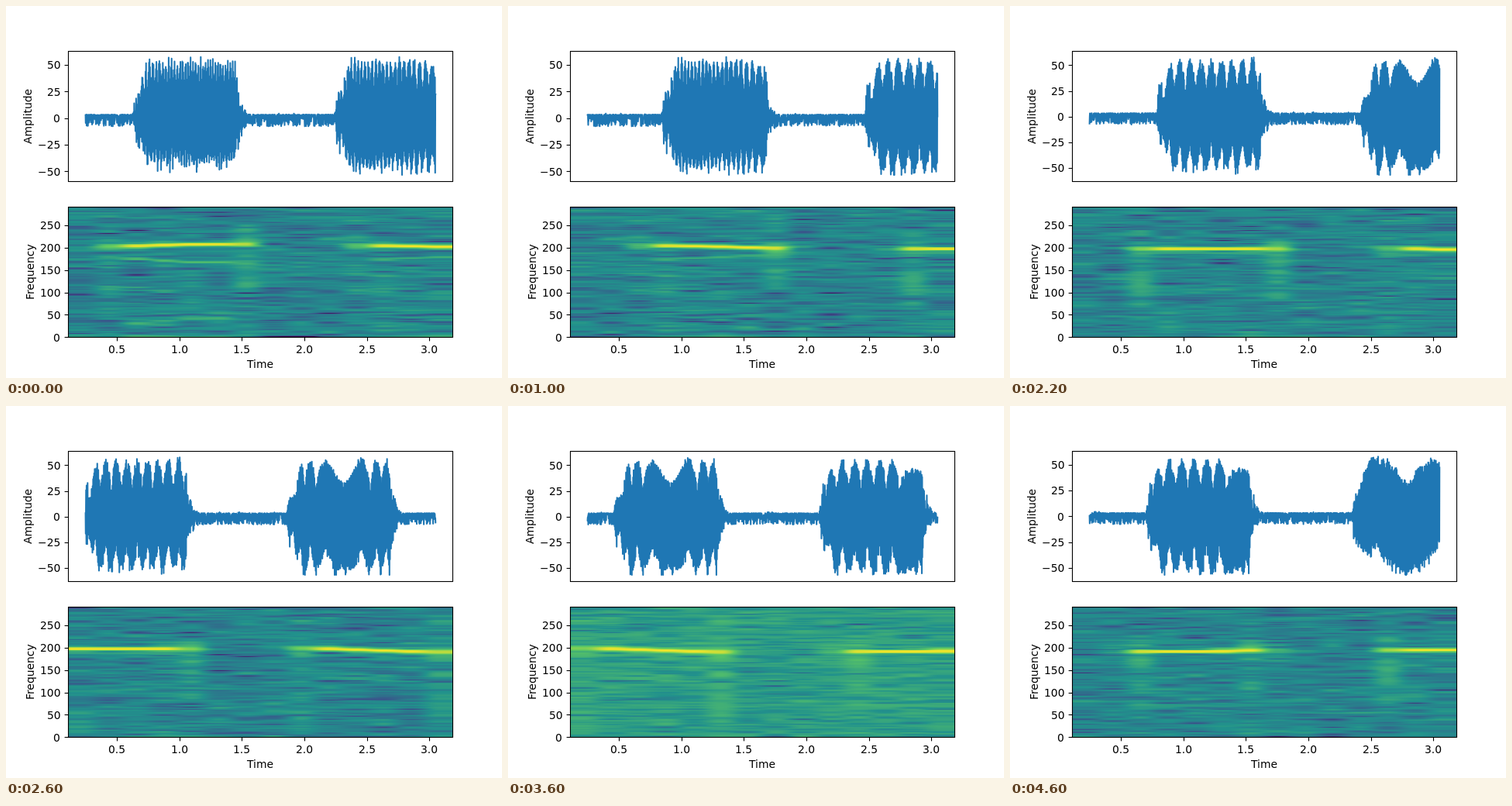
These frames come from a looping animation (640x480 px, 4800 ms). An HTML page with a canvas:

```html
<!DOCTYPE html>
<html lang="en">
<head>
<meta charset="utf-8">
<title>Waveform and spectrogram</title>
<style>
html, body { margin: 0; width: 100%; height: 100%; overflow: hidden; background: #fff; }
canvas { display: block; width: 640px; height: 480px; }
</style>
</head>
<body>
<canvas id="stage" width="640" height="480"></canvas>
<script>
const ctx = document.getElementById('stage').getContext('2d');
const STEP_MS = 200, STEPS = 24;
const HOP = 203, RATE = HOP / 0.28, COUNT = 2030, TOTAL = COUNT + HOP * STEPS;
const NFFT = 256, COLS = 14, ROWS = 129;
const LEFT = 80, WIDTH = 496, HEIGHT = 168, TOP1 = 57.6, TOP2 = 259.2;
const SPEC_RATE = 583;
const T_MIN = 64 / SPEC_RATE, T_SPAN = COLS * 128 / SPEC_RATE;
const TAU = 2 * Math.PI;

const xOf = t => LEFT + (t - T_MIN) / T_SPAN * WIDTH;
const clamp = (v, lo, hi) => Math.max(lo, Math.min(hi, v));
const bump = (d, w) => Math.exp(-d * d / (2 * w * w));
const timeOf = n => 0.25 + n / RATE;
const indexOf = t => Math.round((t - 0.25) * RATE);

function rand(n, seed) {
  let h = Math.imul(n + 1013, 0x9e3779b1) ^ Math.imul(seed + 7, 0x85ebca6b);
  h = Math.imul(h ^ (h >>> 15), 0x2c1b3c6d);
  h = Math.imul(h ^ (h >>> 12), 0x297a2d39);
  return ((h ^ (h >>> 15)) >>> 0) / 4294967296;
}

// Linear interpolation through [x, y] points
function curve(points, x) {
  if (x <= points[0][0]) return points[0][1];
  for (let i = 1; i < points.length; i++) {
    const [x1, y1] = points[i], [x0, y0] = points[i - 1];
    if (x <= x1) return y0 + (y1 - y0) * (x - x0) / (x1 - x0);
  }
  return points[points.length - 1][1];
}

// Beats per second of the tone against a third of the sample rate
const beat = [[0.63, 30], [1.1, 50], [1.5, 51], [2.6, 34], [3.05, 17], [3.87, 12], [4.7, 12],
  [5.49, 19], [6.32, -15.2], [7.15, -10], [7.75, -10], [7.83, -1], [8.8, 2]];
const phase = new Float64Array(TOTAL);
for (let n = 1; n < TOTAL; n++) phase[n] = phase[n - 1] + curve(beat, timeOf(n)) / RATE;

const attack = [[0, 0], [0.02, 0.3], [0.06, 0.38], [0.075, 0.68], [0.13, 1]];
const release = [[0, 1], [0.012, 0.5], [0.03, 0.3], [0.07, 0.1], [0.11, 0]];

// Regular tones, purer each time; each reaches a crest 0.19 s after its onset
function tone(i, n) {
  const start = 0.625 + 1.61 * i + 0.0046 * i * i;
  const a = timeOf(n) - start, b = a - 0.825;
  if (a < 0 || b > 0.15) return 0;
  const fade = Math.pow(0.55, i);
  const u = phase[n] - phase[indexOf(start + 0.19)];
  const angle = TAU * (n + u) / 3;
  const jitter = 0.07 * (rand(Math.floor(n / 10), 2) - 0.5) + 0.13 * (rand(n, 5) - 0.5);
  const wave = (52 - 5 * fade) * (1 + jitter) * Math.cos(angle);
  const overtones = fade * (2.8 * Math.cos(2 * angle) + 2.2 * Math.cos(3 * angle));
  const burst = bump(a - 0.035, 0.015) + bump(b - 0.018, 0.014);
  return curve(attack, a) * curve(release, b) * (wave * (wave < 0 ? 1 - 0.1 * fade : 1) + overtones)
    + 27 * burst * (rand(n, 3) - rand(n - 2, 3));
}

function sampleAt(n) {
  let v = 3.3 - 11 * Math.pow(rand(n, 1), 2.2) + (rand(n, 4) > 0.98 ? 1 : 0);
  for (let i = 0; i < 6; i++) v += tone(i, n);
  return v;
}
const signal = Float32Array.from({ length: TOTAL }, (_, n) => sampleAt(n));

const shades = [[68, 1, 84], [59, 82, 139], [33, 145, 140], [94, 201, 98], [253, 231, 37]];
const palette = Array.from({ length: 256 }, (_, i) => {
  const p = i / 255 * 4, j = Math.min(3, Math.floor(p));
  return shades[j].map((a, c) => a + (shades[j + 1][c] - a) * (p - j));
});

const cosTable = Array.from({ length: NFFT }, (_, i) => Math.cos(TAU * i / NFFT));
const sinTable = Array.from({ length: NFFT }, (_, i) => Math.sin(TAU * i / NFFT));
const hann = Array.from({ length: NFFT }, (_, i) => 0.5 - 0.5 * Math.cos(TAU * i / (NFFT - 1)));

function spectrum(start) {
  const win = hann.map((w, i) => w * signal[start + i]);
  const out = new Float32Array(ROWS);
  for (let r = 0; r < ROWS; r++) {
    let re = 0, im = 0;
    for (let i = 0; i < NFFT; i++) {
      const q = (i * r) & 255;
      re += win[i] * cosTable[q];
      im += win[i] * sinTable[q];
    }
    out[r] = Math.log(re * re + im * im + 1e-6);
  }
  return out;
}

// Smooth weights between neighbouring cells
function taps(size, cells) {
  return Array.from({ length: size }, (_, i) => {
    const p = clamp((i + 0.5) * cells / size - 0.5, 0, cells - 1);
    const a = Math.floor(p), b = Math.min(cells - 1, a + 1);
    return [a, b, 0.5 - 0.5 * Math.cos(Math.PI * (p - a))];
  });
}
const tapX = taps(WIDTH, COLS), tapY = taps(HEIGHT, ROWS);

const layer = document.createElement('canvas');
layer.width = WIDTH;
layer.height = HEIGHT;
const layerCtx = layer.getContext('2d');
const image = layerCtx.createImageData(WIDTH, HEIGHT);

function drawSpectrogram(step) {
  const cols = Array.from({ length: COLS }, (_, c) => spectrum(step * HOP + c * 128));
  const sorted = cols.flatMap(c => Array.from(c)).sort((a, b) => a - b);
  const peak = sorted[sorted.length - 1], mid = sorted[sorted.length >> 1];
  // The colour range widens now and then, which brightens the background
  const level = 0.465 + 0.1 * bump(step % 15 - 3, 0.5);
  const gain = (1 - level) / (peak - mid);
  for (let y = 0; y < HEIGHT; y++) {
    const [r0, r1, wy] = tapY[HEIGHT - 1 - y];
    const line = cols.map(c => c[r0] + (c[r1] - c[r0]) * wy);
    for (let x = 0; x < WIDTH; x++) {
      const [c0, c1, wx] = tapX[x];
      const v = line[c0] + (line[c1] - line[c0]) * wx;
      const rgb = palette[Math.round(255 * clamp(1 - (peak - v) * gain, 0, 1))];
      const p = (y * WIDTH + x) * 4;
      image.data[p] = rgb[0];
      image.data[p + 1] = rgb[1];
      image.data[p + 2] = rgb[2];
      image.data[p + 3] = 255;
    }
  }
  layerCtx.putImageData(image, 0, 0);
  ctx.drawImage(layer, LEFT, 259);
}

// Vertical range of the upper plot, as louder peaks come and go
function limits(step) {
  const hi = step >= 10 && step < 20 ? 58.4 : 57.8;
  const lo = step < 6 ? -53.3 : -56.7;
  const pad = (hi - lo) * 0.05;
  return { hi, lo, top: hi + pad, scale: HEIGHT / (hi - lo + 2 * pad) };
}

function drawWave(step, lim) {
  ctx.beginPath();
  for (let i = 0; i < COUNT; i++) {
    const v = clamp(signal[step * HOP + i], lim.lo, lim.hi);
    ctx.lineTo(xOf(timeOf(i)), TOP1 + (lim.top - v) * lim.scale);
  }
  ctx.strokeStyle = '#1f77b4';
  ctx.lineWidth = 2.08;
  ctx.lineJoin = 'round';
  ctx.lineCap = 'square';
  ctx.stroke();
}

function tick(x0, y0, x1, y1) {
  ctx.beginPath();
  ctx.moveTo(x0, y0);
  ctx.lineTo(x1, y1);
  ctx.stroke();
}

// Text on whole pixels; align is the share of its width left of x
function label(text, x, y, align) {
  ctx.fillText(text, Math.round(x - align * ctx.measureText(text).width), Math.round(y));
}

function yTick(value, y) {
  const line = Math.round(y) + 0.5;
  tick(75.6, line, 80.5, line);
  label(String(value).replace('-', '\u2212'), 70.3, y + 5.3, 1);
}

function sideLabel(text, x, y) {
  ctx.save();
  ctx.translate(x, Math.round(y));
  ctx.rotate(-Math.PI / 2);
  label(text, 0, 0, 0.5);
  ctx.restore();
}

function drawAxes(lim) {
  ctx.strokeStyle = ctx.fillStyle = '#000';
  ctx.lineWidth = 1.11;
  ctx.lineJoin = 'miter';
  ctx.lineCap = 'butt';
  ctx.font = '13.89px "DejaVu Sans", sans-serif';
  ctx.strokeRect(80.5, 58.5, WIDTH, HEIGHT);
  ctx.strokeRect(80.5, 259.5, WIDTH, HEIGHT);
  for (let v = 50; v >= -50; v -= 25) yTick(v, TOP1 + (lim.top - v) * lim.scale);
  for (let f = 0; f <= 250; f += 50) yTick(f, TOP2 + HEIGHT - f * 2 * HEIGHT / SPEC_RATE);
  for (let t = 0.5; t <= 3; t += 0.5) {
    const x = Math.round(xOf(t)) + 0.5;
    tick(x, 427.5, x, 432.4);
    label(t.toFixed(1), xOf(t), 448, 0.5);
  }
  label('Time', 328, 467, 0.5);
  sideLabel('Amplitude', 33, 141.6);
  sideLabel('Frequency', 36, 343.2);
}

function draw(step) {
  const lim = limits(step);
  ctx.fillStyle = '#fff';
  ctx.fillRect(0, 0, 640, 480);
  drawWave(step, lim);
  drawSpectrogram(step);
  drawAxes(lim);
}

const start = performance.now();
let shown = -1;
function frame() {
  const step = Math.floor((performance.now() - start) / STEP_MS) % STEPS;
  if (step !== shown) {
    shown = step;
    draw(step);
  }
  requestAnimationFrame(frame);
}
frame();
</script>
</body>
</html>
```
